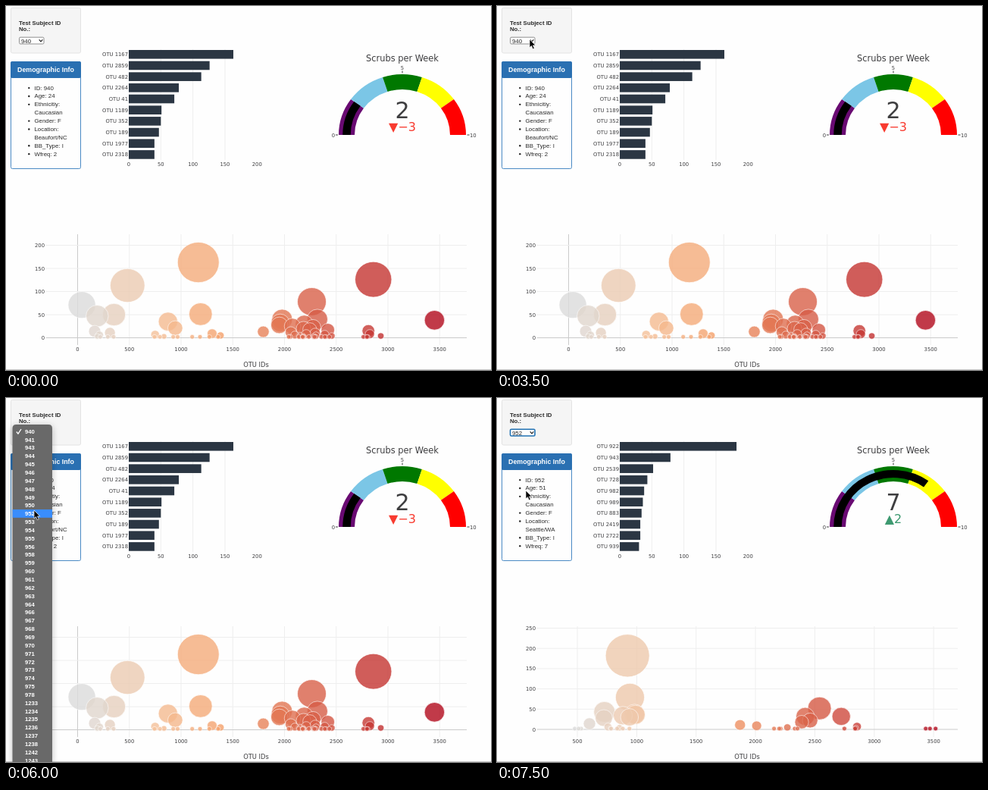
Write an HTML page that moves like this. It is 640 px wide and 480 px high and loops after 8 s.

```html
<!DOCTYPE html>
<html lang="en">
<head>
<meta charset="utf-8">
<title>Sample dashboard</title>
<style>
  html, body { margin: 0; width: 100%; height: 100%; overflow: hidden; background: #fefefe; }
  svg { display: block; width: 640px; height: 480px; }
  .ui { font-family: "Liberation Sans", Arial, sans-serif; font-size: 7.85px; fill: #2b2b2b; }
  .chart { font-family: "DejaVu Sans", Verdana, sans-serif; font-size: 6.8px; fill: #3e3e40; }
  .bold { font-weight: bold; }
</style>
</head>
<body>
<svg id="stage" viewBox="0 0 640 480"></svg>
<script>
const STEP = 500, LOOP = 8000;
const PAPER = '#fefefe', GRID = '#eeeeee', ZERO = '#cbcbcb', INK = '#3e3e40';

const subjects = {
  940: {
    info: ['ID: 940', 'Age: 24', 'Ethnicitiy:', '\tCaucasian', 'Gender: F', 'Location:', '\tBeaufort/NC', 'BB_Type: I', 'Wfreq: 2'],
    wash: 2,
    x: { zero: 94.5, unit: .1365, first: 0 },
    y: { zero: 437.5, unit: .61, max: 200 },
    top: { 1167: 163, 2859: 126, 482: 113, 2264: 78, 41: 71, 1189: 51, 352: 50, 189: 47, 2318: 40, 1977: 40 },
    next: { ids: [3450, 874, 1959, 2191, 1950, 2077, 2275, 944, 2184, 2244, 2419, 2811, 165, 1795], value: 38, decay: .92 },
    tail: { count: 48, centers: [2200, 260, 2250, 1240, 2100, 2820, 2350, 860], spread: 150 }
  },
  952: {
    info: ['ID: 952', 'Age: 51', 'Ethnicitiy:', '\tCaucasian', 'Gender: F', 'Location:', '\tSeattle/WA', 'BB_Type: I', 'Wfreq: 7'],
    wash: 7,
    x: { zero: 27.7, unit: .1567, first: 500 },
    y: { zero: 437, unit: .534, max: 250 },
    top: { 922: 182, 943: 79, 2539: 52, 728: 43, 982: 38, 989: 36, 883: 34, 2722: 32, 2419: 32, 939: 30 },
    next: { ids: [723, 2460, 2389, 602, 1870, 2010, 2855], value: 28, decay: .8 },
    tail: { count: 22, centers: [860, 2230, 820, 2800, 2250, 3430, 450], spread: 110 }
  }
};

function seededRandom(seed) {
  return () => {
    seed = (seed * 16807) % 2147483647;
    return seed / 2147483647;
  };
}

// Values fall off geometrically after the ten largest; the smallest gather around a few ids.
function samplesOf({ top, next, tail }) {
  const random = seededRandom(4711);
  const largest = Object.entries(top).map(([id, v]) => [+id, v]).sort((a, b) => b[1] - a[1]);
  const scattered = Array.from({ length: tail.count }, (_, i) =>
    tail.centers[i % tail.centers.length] + (random() * 2 - 1) * tail.spread);
  const rest = [...next.ids, ...scattered].map((id, i) => [id, Math.max(2, Math.round(next.value * next.decay ** i))]);
  return [...largest, ...rest];
}
for (const subject of Object.values(subjects)) subject.samples = samplesOf(subject);

const menuIds = [[940, 941], [943, 950], [952, 956], [958, 964], [966, 975], [978, 978], [1233, 1238], [1242, 1243]]
  .flatMap(([from, to]) => Array.from({ length: to - from + 1 }, (_, i) => from + i));

const reds = [[0, 220, 220, 220], [.2, 245, 195, 157], [.4, 245, 160, 105], [1, 178, 10, 28]];

function scaleColor(t) {
  const i = Math.max(1, reds.findIndex(s => s[0] >= t));
  const a = reds[i - 1], b = reds[i];
  const k = (t - a[0]) / (b[0] - a[0]);
  return `rgb(${[1, 2, 3].map(c => Math.round(a[c] + (b[c] - a[c]) * k))})`;
}

const text = (x, y, str, cls = 'chart', extra = '') => `<text x="${x}" y="${y}" class="${cls}" ${extra}>${str}</text>`;
const rect = (x, y, w, h, fill, extra = '') => `<rect x="${x}" y="${y}" width="${w}" height="${h}" fill="${fill}" ${extra}/>`;
const line = (x1, y1, x2, y2, color) => `<path d="M${x1} ${y1}L${x2} ${y2}" stroke="${color}"/>`;
const MIDDLE = 'text-anchor="middle"', END = 'text-anchor="end"';
const size = px => `style="font-size:${px}px"`;

function selector(chosen, focused) {
  const border = focused ? 'stroke="#2373b4" stroke-width="1.6"' : 'stroke="#767676" stroke-width=".8"';
  return rect(6.5, 2.5, 92, 59.5, '#f5f5f5', 'stroke="#e3e3e3" rx="2"')
    + text(17, 25.3, 'Test Subject ID', 'ui bold', size(7.75))
    + text(17, 33.3, 'No.:', 'ui bold', size(7.75))
    + rect(17.5, 41.2, 32.5, 8.8, PAPER, border + ' rx="1.5"')
    + text(20, 48.5, chosen, 'ui')
    + '<path d="M43.7 44.4l2.3 2.5 2.3-2.5" fill="none" stroke="#222" stroke-width="1.2"/>';
}

function demographics(info) {
  const rows = info.map((row, i) => {
    const y = 110.6 + i * 10.88;
    const bullet = row[0] === '\t' ? '' : `<circle cx="30.3" cy="${y - 2.5}" r="1.2" fill="#222"/>`;
    return bullet + text(37.5, y, row.trim(), 'ui');
  }).join('');
  return rect(6.5, 73.5, 92, 141, PAPER, 'stroke="#4a8ac4" rx="2"')
    + rect(6, 73, 93, 22, '#2a70b2', 'rx="2"')
    + text(52.5, 87.2, 'Demographic Info', 'ui bold', MIDDLE + ' style="font-size:8.8px;fill:#fff"')
    + rows;
}

function barChart(samples) {
  const x = v => 162 + v * .8465;
  let out = '';
  for (let v = 0; v <= 200; v += 50) {
    if (v > 0 && v < 200) out += line(x(v), 57, x(v), 203, GRID);
    out += text(x(v), 210.6, v, 'chart', MIDDLE);
  }
  samples.slice(0, 10).forEach(([id, v], i) => {
    const y = 63.8 + i * 14.68;
    out += rect(162, y - 5.8, x(v) - 162, 11.6, '#2b3643') + text(161, y + 2.5, 'OTU ' + id, 'chart', END);
  });
  return out;
}

function ringSlice(from, to, inner, outer, fill) {
  const at = (v, r) => `${-r * Math.cos(v * Math.PI / 10)} ${-r * Math.sin(v * Math.PI / 10)}`;
  return `<path fill="${fill}" d="M${at(from, outer)}A${outer} ${outer} 0 0 1 ${at(to, outer)}`
    + `L${at(to, inner)}A${inner} ${inner} 0 0 0 ${at(from, inner)}Z"/>`;
}

function gauge(value) {
  const bands = ['#690a72', '#7bc6e6', '#007800', '#ffff00', '#ff0000'];
  const diff = value - 5;
  const delta = diff < 0 ? '▼−' + -diff : '▲' + diff;
  const tint = diff < 0 ? '#f83b30' : '#3d9970';
  return '<g transform="translate(523 170) scale(1 .952)">'
    + bands.map((c, i) => ringSlice(i * 2, i * 2 + 2, 63, 84, c)).join('')
    + ringSlice(0, value, 68.25, 78.75, '#000') + '</g>'
    + line(435, 170, 438, 170, INK) + line(523, 85.5, 523, 88.5, INK) + line(608.5, 170, 611.5, 170, INK)
    + text(434, 172.6, 0, 'chart', END) + text(523, 84.3, 5, 'chart', MIDDLE) + text(612, 172.6, 10)
    + text(523, 72.6, 'Scrubs per Week', 'chart', MIDDLE + ' ' + size(11.4))
    + text(523, 148, value, 'chart', MIDDLE + ' ' + size(30))
    + text(523, 165, delta, 'chart', `${MIDDLE} style="font-size:16px;fill:${tint}"`);
}

function bubbleChart({ x, y, samples }) {
  const px = v => x.zero + v * x.unit, py = v => y.zero - v * y.unit;
  let out = '';
  for (let v = x.first; v <= 3500; v += 500) {
    out += line(px(v), 301, px(v), 447, v ? GRID : ZERO) + text(px(v), 454.8, v, 'chart', MIDDLE);
  }
  for (let v = 0; v <= y.max; v += 50) {
    out += line(53, py(v), 608, py(v), v ? GRID : ZERO) + text(51, py(v) + 2.5, v, 'chart', END);
  }
  const ids = samples.map(s => s[0]);
  const low = Math.min(...ids), span = Math.max(...ids) - low;
  for (const [id, v] of samples) {
    const r = 2.154 * Math.sqrt(v);
    out += `<ellipse cx="${px(id)}" cy="${py(v)}" rx="${r}" ry="${r * .97}" fill="${scaleColor((id - low) / span)}"`
      + ' stroke="#fff" stroke-width=".7" opacity=".8"/>';
  }
  return out + text(330, 475.6, 'OTU IDs', 'chart', MIDDLE + ' ' + size(8.3));
}

function menu(hovered) {
  const pitch = 10.85;
  let out = '<path d="M8.5 480V40q0-5 5-5H56q5 0 5 5V480Z" fill="#696969" style="filter:drop-shadow(0 2px 4px #0004)"/>';
  menuIds.forEach((id, i) => {
    const y = 43.9 + i * pitch;
    if (id === hovered) out += rect(8.5, y - pitch / 2, 52.5, pitch, '#3a8dfc');
    out += text(25, y + 2.8, id, 'ui bold', 'style="font-size:7.7px;fill:#fff"');
  });
  return out + '<path d="M13.8 44.5l2.2 2.7 4-6.2" fill="none" stroke="#fff" stroke-width="1.3"/>';
}

const cursor = ([x, y]) => `<path transform="translate(${x} ${y})" d="M0 0V10.8L2.5 8.6 4.3 12.7 6.3 11.8 4.5 7.9H7.8Z"`
  + ' fill="#000" stroke="#fff" stroke-width=".7"/>';

// Each scene holds from its start time until the next one begins.
const scenes = [
  { at: 0 },
  { at: 2000, pointer: [42, 53] },
  { at: 2500, pointer: [43, 44] },
  { at: 4000, pointer: [43, 44], hovered: 940 },
  { at: 5500, pointer: [40, 99], hovered: 946 },
  { at: 6000, pointer: [37, 148], hovered: 952 },
  { at: 6500, pointer: [37, 148.5], chosen: 952 },
  { at: 7000, pointer: [38, 122], chosen: 952, shown: 952 }
];

const stage = document.getElementById('stage');
let current = null;

function draw(time) {
  const now = Math.floor(time % LOOP / STEP) * STEP;
  const scene = scenes.filter(s => s.at <= now).pop();
  if (scene === current) return;
  current = scene;
  const { pointer, hovered, chosen = 940, shown = 940 } = scene;
  const subject = subjects[shown];
  stage.innerHTML = rect(0, 0, 640, 480, PAPER)
    + line(0, 479.5, 640, 479.5, '#c9c9c9')
    + selector(chosen, chosen !== 940)
    + demographics(subject.info)
    + barChart(subject.samples)
    + gauge(subject.wash)
    + bubbleChart(subject)
    + (hovered ? menu(hovered) : '')
    + (pointer ? cursor(pointer) : '');
}

const start = performance.now();
function tick() {
  draw(performance.now() - start);
  requestAnimationFrame(tick);
}
tick();
</script>
</body>
</html>
```
